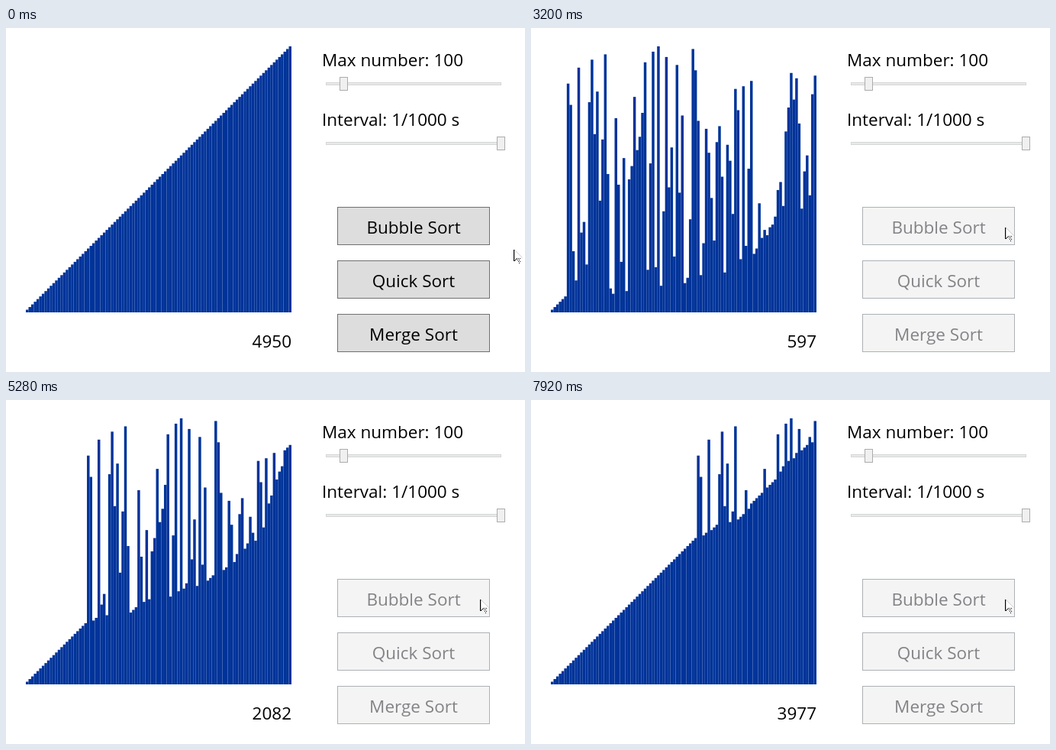
These frames come from a looping animation (680 px wide and 450 px high, 8 s). An HTML page with a canvas:

```html
<!DOCTYPE html>
<html lang="en">
<head>
<meta charset="utf-8">
<title>Bubble sort</title>
<style>
  html, body { margin: 0; width: 100%; height: 100%; overflow: hidden; background: #fff; }
  canvas { display: block; }
</style>
</head>
<body>
<canvas width="680" height="450"></canvas>
<script>
const ctx = document.querySelector('canvas').getContext('2d');
const LOOP = 8000, STEP = 80, N = 100, UNIT = 3.48;
const SHUFFLE_AT = 1760, SORT_AT = 2400;

const sorted = Array.from({ length: N }, (_, i) => i + 1);
const shuffled = [
  86, 78, 23, 12, 92, 30, 34, 18, 79, 95, 67, 83, 42, 65, 97, 52, 9, 4, 73, 48,
  19, 58, 8, 50, 55, 81, 61, 66, 75, 94, 16, 56, 98, 17, 100, 7, 38, 96, 47, 62,
  21, 93, 45, 74, 2, 5, 35, 99, 91, 72, 14, 26, 69, 60, 43, 27, 64, 70, 51, 11,
  63, 57, 37, 84, 76, 10, 85, 25, 54, 87, 15, 13, 41, 6, 31, 24, 20, 36, 46, 49,
  40, 68, 77, 90, 80, 88, 71, 28, 53, 59, 29, 44, 32, 33, 89, 22, 39, 3, 1, 82
];

// [time, value...] keys
const pace = [[2400, 21], [3200, 597], [4400, 1439], [5280, 2082], [6800, 3205], [7920, 3977]];
const pointer = [[720, 665, 290], [800, 650, 273], [880, 633, 257], [960, 628, 253],
  [1040, 628, 253], [1360, 621, 261]];

function sample(keys, t) {
  if (t <= keys[0][0]) return keys[0].slice(1);
  const i = keys.findIndex(k => k[0] >= t);
  if (i < 0) return keys[keys.length - 1].slice(1);
  const a = keys[i - 1], b = keys[i], f = (t - a[0]) / (b[0] - a[0]);
  return a.slice(1).map((v, j) => Math.round(v + (b[j + 1] - v) * f));
}

// Bubble sort from the right, stopped after a number of comparisons
function bubble(list, count) {
  const a = list.slice();
  for (let i = 0; i < N; i++) {
    for (let j = N - 1; j > i; j--) {
      if (count-- <= 0) return a;
      if (a[j - 1] > a[j]) [a[j - 1], a[j]] = [a[j], a[j - 1]];
    }
  }
  return a;
}

function text(s, x, y, align = 'left', color = '#000') {
  ctx.font = '22.5px "Open Sans", "Noto Sans", sans-serif';
  ctx.textAlign = align;
  ctx.fillStyle = color;
  ctx.fillText(s, x, y);
}

function box(x, y, w, h, fill, stroke) {
  ctx.fillStyle = fill;
  ctx.fillRect(x, y, w, h);
  ctx.strokeStyle = stroke;
  ctx.lineWidth = 1;
  ctx.strokeRect(x + .5, y + .5, w - 1, h - 1);
}

function slider(label, y, thumbX) {
  text(label, 414, y - 23);
  box(419, y - 2, 230, 4, '#e7eaea', '#d6d6d6');
  box(thumbX, y - 9, 11, 18, '#f0f0f0', '#acacac');
}

const styles = {
  normal: ['#dddddd', '#707070', '#000'],
  hover: ['#bee6fd', '#3c7fb1', '#000'],
  pressed: ['#c4e5f6', '#2c628b', '#000'],
  disabled: ['#f4f4f4', '#adb2b5', '#838387']
};

function button(label, y, state) {
  const [fill, edge, color] = styles[state];
  box(434, y, 200, 50, fill, edge);
  text(label, 534, y + 35, 'center', color);
}

function cursor(x, y) {
  ctx.save();
  ctx.translate(x, y);
  ctx.fillStyle = '#fff';
  ctx.strokeStyle = '#c4c4c4';
  ctx.lineWidth = .8;
  ctx.beginPath();
  ctx.moveTo(.5, 0);
  for (const [px, py] of [[11.5, 11], [7, 11.5], [9, 16.5], [6.5, 17.5], [4.5, 12.5], [.5, 16]]) ctx.lineTo(px, py);
  ctx.fill();
  ctx.beginPath();
  ctx.moveTo(1, 0);
  ctx.lineTo(11.5, 10.5);
  ctx.stroke();
  ctx.fillStyle = '#000';
  ctx.fillRect(0, 0, 1.2, 15);
  for (const [px, py] of [[1, 14], [2, 13], [3, 12], [4, 11], [6, 11], [8, 11], [5, 13], [7, 13], [6, 15], [8, 15], [7, 17]])
    ctx.fillRect(px, py, 1, 1);
  ctx.restore();
}

function draw(t) {
  t = Math.floor(t / STEP) * STEP;
  const count = t < SHUFFLE_AT ? 4950 : t < SORT_AT ? 0 : sample(pace, t)[0];
  const bars = t < SHUFFLE_AT ? sorted : bubble(shuffled, count);

  ctx.fillStyle = '#fff';
  ctx.fillRect(0, 0, 680, 450);
  ctx.fillStyle = '#003399';
  bars.forEach((v, i) => ctx.fillRect(26 + i * UNIT, 372 - v * UNIT, UNIT, v * UNIT));
  text(count, 374, 418, 'right');

  slider('Max number: 100', 73, 437);
  slider('Interval: 1/1000 s', 151, 643);

  const idle = t < SHUFFLE_AT ? 'normal' : 'disabled';
  const active = t < 880 || t >= SHUFFLE_AT ? idle : t < 1520 ? 'hover' : 'pressed';
  button('Bubble Sort', 234, active);
  button('Quick Sort', 304, idle);
  button('Merge Sort', 374, idle);
  cursor(...sample(pointer, t));
}

const start = performance.now();
function tick() {
  draw((performance.now() - start) % LOOP);
  requestAnimationFrame(tick);
}
tick();
</script>
</body>
</html>
```
